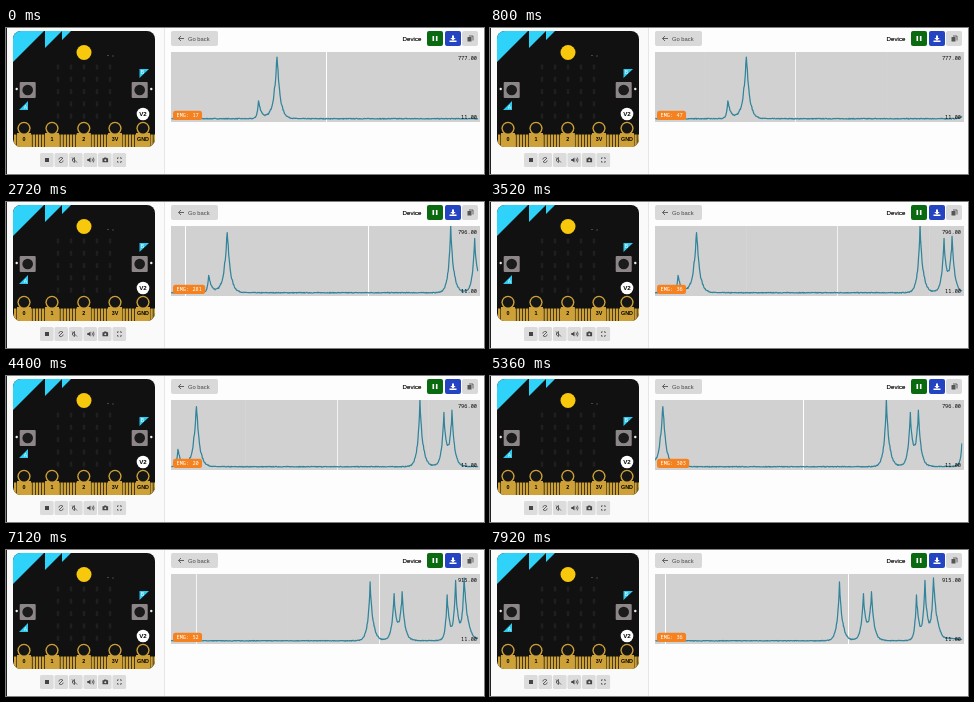
An HTML page for the animation above (8 s loop, 478 px wide and 146 px high).

```html
<!DOCTYPE html>
<html lang="en">
<head>
<meta charset="utf-8">
<title>Sensor graph</title>
<style>
  html, body { margin: 0; width: 100%; height: 100%; overflow: hidden; background: #fff; }
  svg { display: block; width: 100%; height: 100%; }
  text { font-family: "Liberation Sans", Arial, sans-serif; }
  .mono { font-family: "Noto Sans Mono", "DejaVu Sans Mono", monospace; font-size: 5.3px; font-weight: 500; }
  .pin { font-size: 5.4px; font-weight: bold; text-anchor: middle; }
  .flag { font-size: 5px; fill: #fff; text-anchor: middle; }
  .icon { fill: none; stroke: #444; stroke-width: .8; }
</style>
</head>
<body>
<svg viewBox="0 0 478 146" preserveAspectRatio="none">
  <defs>
    <clipPath id="boardClip"><rect x="7" y="3" width="142" height="116" rx="8"/></clipPath>
    <clipPath id="plotClip"><rect x="165" y="24" width="307.5" height="70"/></clipPath>
  </defs>
  <rect width="478" height="146" fill="#fdfdfd"/>
  <rect width="158" height="146" fill="#fafafa"/>
  <rect width="1" height="146" fill="#222"/>
  <rect x="158" width="1" height="146" fill="#e6e6e6"/>

  <g clip-path="url(#boardClip)">
    <rect x="7" y="3" width="142" height="116" fill="#111"/>
    <path d="M7 3H38L7 34ZM39 3H56L39 20ZM56 3H65L56 12Z" fill="#2fd3fa"/>
    <g id="leds" fill="#1f1f1f"></g>
    <g id="pins" fill="#cda137"></g>
  </g>
  <circle cx="78" cy="24.5" r="7.5" fill="#f8c80c"/>
  <path d="M101 27.5h2M106 28h2" stroke="#555" stroke-width=".8"/>
  <g id="keys"></g>
  <path d="M13 82H22V73ZM133.500 41H143L133.500 50Z" fill="#2fc8ee"/>
  <text x="19.300" y="81" class="flag">A</text>
  <text x="136.300" y="46.300" class="flag">B</text>
  <circle cx="137" cy="86" r="6.3" fill="#fff"/>
  <text x="137" y="88.300" font-size="6.2" font-weight="bold" text-anchor="middle">V2</text>

  <g id="tools" fill="#dcdcdc"></g>
  <rect x="39" y="130" width="4" height="4" fill="#444"/>
  <g class="icon">
    <path d="M52.800 131.500a2.300 2.300 0 0 1 4.200-1M57.200 132.500a2.300 2.300 0 0 1-4.200 1M53 134l4-4"/>
    <path d="M66.500 131l2-1.500v5l-2-1.500zM66 129.500l5 5"/>
    <path d="M86 130.500q1 1.500 0 3M87.300 129.500q1.500 2.500 0 5"/>
    <path d="M111.500 131v-1.200h1.200M114 129.800h1.200v1.200M115.200 133v1.200h-1.200M112.700 134.200h-1.200v-1.200"/>
  </g>
  <path d="M81.300 131h1.300l1.900-1.500v5l-1.900-1.500h-1.300zM96.500 130.300h1.300l.6-.8h1.800l.6.8h1.300v4h-5.600z" fill="#444"/>
  <circle cx="99.300" cy="132.200" r="1" fill="#ddd"/>

  <rect x="165" y="3" width="47" height="15" rx="2" fill="#d9d9d9"/>
  <path d="M178 10.500h-5.300M175 8l-2.500 2.500 2.500 2.500" class="icon"/>
  <text x="182" y="12.800" font-size="5.8" fill="#444">Go back</text>
  <text x="396.500" y="13" font-size="6.2" stroke="#000" stroke-width=".15">Device</text>
  <rect x="421" y="3" width="16" height="15" rx="2" fill="#0a6a10"/>
  <path d="M427.300 8v5M430.700 8v5" stroke="#fff" stroke-width="1.600"/>
  <rect x="439" y="3" width="16" height="15" rx="2" fill="#2444c2"/>
  <path d="M446 7.500h2v2.500h1.700l-2.700 2.500-2.700-2.500h1.700zM443.500 12.500h7v1.500h-7z" fill="#fff"/>
  <rect x="456" y="3" width="16" height="15" rx="2" fill="#d9d9d9"/>
  <rect x="461.500" y="9" width="4" height="4.500" fill="#555"/>
  <path d="M463 8h4v4.500" class="icon"/>

  <rect x="165" y="24" width="309" height="70" fill="#d1d1d1"/>
  <g clip-path="url(#plotClip)">
    <g id="grid" stroke="#fff"></g>
    <path id="trace" fill="none" stroke="#32849a" stroke-width="1.25" stroke-linejoin="round"/>
  </g>
  <text id="top" class="mono" x="471" y="32" text-anchor="end"></text>
  <text class="mono" x="471" y="91" text-anchor="end">11.00</text>
  <rect id="badge" x="167" y="82.800" height="9.200" rx="2.500" fill="#f58220"/>
  <text id="value" class="mono" x="170.500" y="89.400" fill="#fff"></text>
</svg>
<script>
const NS = "http://www.w3.org/2000/svg";
const $ = id => document.getElementById(id);
const LOOP = 8000, STEP = 80, SPEED = 1.465, EDGE = 472, LOW = 11;

function add(parent, tag, attrs, text) {
  const el = document.createElementNS(NS, tag);
  for (const key in attrs) el.setAttribute(key, attrs[key]);
  if (text) el.textContent = text;
  return $(parent).appendChild(el);
}

// Board
for (let i = 0; i < 25; i++) {
  add("leds", "rect", { x: 50.7 + (i % 5) * 13, y: 36.5 + Math.floor(i / 5) * 12.3, width: 2.6, height: 5 });
}
for (let x = 8; x < 149; x += 3.1) add("pins", "rect", { x, y: 106.5, width: 2.4, height: 13 });
const pads = { "0 ": 18, "1 ": 46, "2 ": 77.8, "3V": 109, "GND": 137 };
for (const [label, x] of Object.entries(pads)) {
  add("pins", "rect", { x: x - 7, y: 105, width: 14, height: 14 });
  add("pins", "circle", { cx: x, cy: 100.3, r: 6.6 });
  add("pins", "circle", { cx: x, cy: 100.3, r: 5.2, fill: "#151515" });
  add("pins", "text", { x, y: 113, class: "pin", fill: "#000" }, label.trim());
}
for (const side of [-1, 1]) {
  const x = 77.7 + side * 56;
  add("keys", "rect", { x: x - 8, y: 54, width: 16, height: 16, rx: 1, fill: "#8d8688" });
  add("keys", "circle", { cx: x, cy: 62, r: 5.3, fill: "#1b1b1b" });
  add("keys", "circle", { cx: 78 + side * 67.3, cy: 61, r: 1.2, fill: "#eee" });
}
for (let i = 0; i < 6; i++) {
  add("tools", "rect", { x: 34 + i * 14.5, y: 125, width: 13.6, height: 14, rx: 1.5 });
}

// Muscle bursts: position, height, rise and fall lengths
const bursts = [
  [252.5, 210, 1.3, 3],
  [271, 760, 3.2, 3.1],
  [494.5, 778, 2.4, 3.03],
  [518.5, 610, 2.4, 2.64],
  [526.5, 620, 2.4, 2.7],
  [571.5, 620, 1.665, 2.4],
  [580, 780, 2, 2.5],
  [588.5, 866, 2, 3.54],
  [606, 25, 5, 16]
];

function reading(x) {
  const base = 17 + 0.04 * Math.max(0, x - EDGE);
  return bursts.reduce((sum, [at, height, rise, fall]) =>
    sum + height * Math.exp(-Math.abs(x - at) / (x < at ? rise : fall)), base);
}

let seed = 7;
const random = () => (seed = (seed * 16807) % 2147483647) / 2147483647 - 0.5;

// Samples with jitter that grows with the signal, and the highest reading so far
const samples = [];
for (let x = 160, high = 777; x < 630; x += 0.5) {
  const v = reading(x);
  high = Math.max(high, v);
  samples.push({ x, high, v: Math.max(LOW, v + random() * (6 + v * 0.12)) });
}
const highest = edge => samples[Math.floor((edge - 160) * 2)].high;

const lines = Array.from({ length: 5 }, () => add("grid", "line", { y1: 24, y2: 94 }));

function draw(time) {
  const n = Math.floor((time % LOOP) / STEP);
  const shift = n * SPEED, edge = EDGE + shift;

  // The vertical range settles over a few steps
  let range = 0;
  for (let i = 0; i < 4; i++) range += highest(edge - i * SPEED) / 4;
  const place = ({ x, v }) =>
    (x - shift).toFixed(2) + " " + (91.2 - (v - LOW) / (range - LOW) * 64.2).toFixed(2);

  const now = reading(edge);
  const seen = samples.filter(s => s.x > 165 + shift && s.x < edge);
  $("trace").setAttribute("d", "M" + [...seen, { x: edge, v: now }].map(place).join("L"));

  // Thin grid lines shimmer as they cross pixel borders
  lines.forEach((line, k) => {
    const x = Math.round(229 + 91.5 * k - shift - 0.5) + 0.5;
    const glow = 0.4 - 0.6 * Math.cos(2 * Math.PI * 0.4848 * n + Math.PI * k);
    line.setAttribute("x1", x);
    line.setAttribute("x2", x);
    line.setAttribute("opacity", Math.max(0, glow));
  });

  const label = "EMG: " + Math.round(now);
  $("top").textContent = Math.round(highest(edge)) + ".00";
  $("value").textContent = label;
  $("badge").setAttribute("width", 7 + label.length * 3.15);
}

const start = performance.now();
function tick() {
  draw(performance.now() - start);
  requestAnimationFrame(tick);
}
tick();
</script>
</body>
</html>
```
